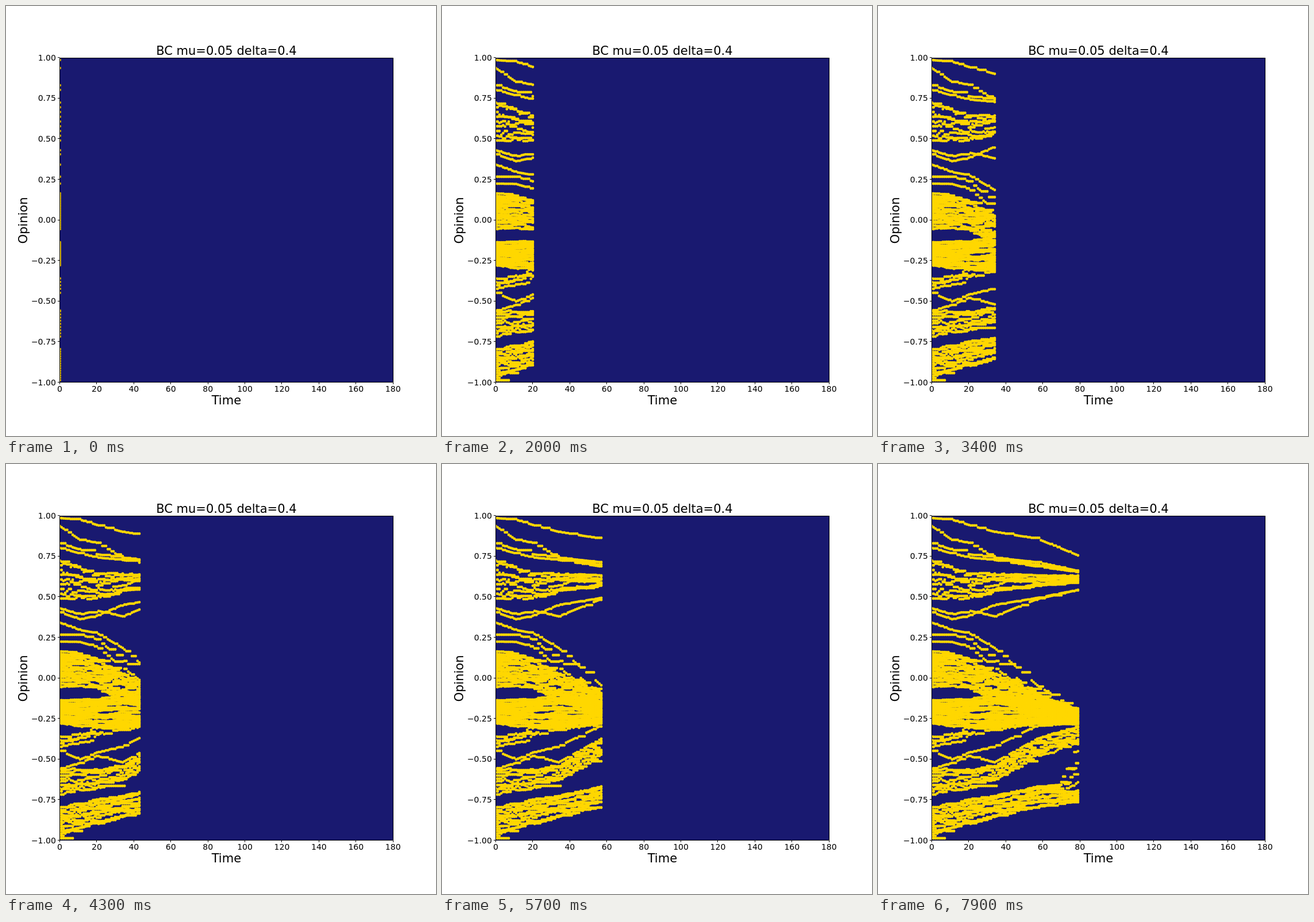
These frames come from a looping animation (748x748 px, 8 s). An HTML page with a canvas:

```html
<!DOCTYPE html>
<html lang="en">
<head>
<meta charset="utf-8">
<title>Opinion dynamics</title>
<style>
  html, body { margin: 0; width: 100%; height: 100%; overflow: hidden; background: #fff; }
  canvas, svg { position: absolute; left: 0; top: 0; width: 748px; height: 748px; }
  text { font-family: "DejaVu Sans", Verdana, sans-serif; font-size: 14px; text-anchor: middle; }
  .big { font-size: 21px; }
  .y { text-anchor: end; }
  path { fill: none; stroke: #000; stroke-width: 1; }
</style>
</head>
<body>
<canvas id="plot" width="748" height="748"></canvas>
<svg id="axes" viewBox="0 0 748 748">
  <text class="big" x="383.4" y="85">BC mu=0.05 delta=0.4</text>
  <text class="big" x="383.4" y="693">Time</text>
  <text class="big" transform="translate(37 373) rotate(-90)">Opinion</text>
</svg>
<script>
const LEFT = 93.5, RIGHT = 673.5, TOP = 90.5, BOTTOM = 654.5;
const UNIT = (673.2 - 93.5) / 180, STEP = 100, STEPS = 80, RADIUS = 2.4;

// Heights of single agents at the knot times.
const KNOTS = [0, 11, 20, 34, 57, 79];
const loners = [
  [94, 97, 106, 118, 130, 159],
  [108, 132, 137, 163, 171, 186],
  [251, 262, 255, 265, 235, 219],
  [258, 270, 264, 245, 233, 219],
  [276, 289, 294, 320, 385, 430],
  [499, 514, 502, 491, 455, 449],
  [530, 520, 508, 519, 478, 458]
];

// Crowds fill a strip below their top edge; widths are early, middle and late.
const crowds = [
  { size: 2, width: [8, 4, 1], top: [138, 149, 157, 163, 176, 187] },
  { size: 9, width: [66, 30, 11], top: [168, 181, 190, 190, 194, 194] },
  { size: 2, width: [12, 14, 1], top: [297, 297, 305, 340, 402, 432] },
  { size: 22, width: [62, 50, 13], top: [326, 328, 337, 365, 400, 429] },
  { size: 24, width: [40, 62, 17], top: [411, 410, 407, 400, 412, 436] },
  { size: 4, width: [18, 24, 5], top: [474, 469, 456, 437, 442, 446] },
  { size: 9, width: [44, 28, 34], top: [531, 529, 531, 522, 477, 456] },
  { size: 14, width: [54, 37, 33], top: [597, 588, 583, 577, 561, 556], rise: true }
];

let seed = 20;
function random() {
  seed = (seed * 1664525 + 1013904223) >>> 0;
  return seed / 4294967296;
}

function mix(a, b, t) { return a + (b - a) * t; }

function at(curve, t) {
  let i = 0;
  while (KNOTS[i + 1] < t) i++;
  return mix(curve[i], curve[i + 1], (t - KNOTS[i]) / (KNOTS[i + 1] - KNOTS[i]));
}

function widthAt([early, middle, late], t) {
  return t < 34 ? mix(early, middle, t / 34) : mix(middle, late, (t - 34) / 45);
}

const columns = Array.from({ length: STEPS }, () => new Path2D());
function dot(k, y) {
  const x = LEFT + k * UNIT;
  columns[k].moveTo(x + RADIUS, y);
  columns[k].arc(x, y, RADIUS, 0, Math.PI * 2);
}

// Opinions stay put until an encounter moves them.
function trace(chance, position) {
  let y = position(0);
  for (let k = 0; k < STEPS; k++) {
    if (k && random() < chance) y = position(k);
    dot(k, y);
  }
}

for (const curve of loners) trace(0.65, k => at(curve, k));

for (const { size, width, top, rise } of crowds) {
  for (let i = 0; i < size; i++) {
    const home = i / (size - 1);
    let u = home;
    trace(0.45, k => {
      if (k && size > 2) u += (random() - 0.5) * 1.6 / size + (home - u) * 0.2;
      u = Math.min(1, Math.max(0, u));
      // The nearest agents are pulled up late by the neighbouring crowd.
      const lift = rise ? Math.max(0, k - 69) * Math.max(0, 0.4 - home) * 18 : 0;
      return at(top, k) + widthAt(width, k) * u - lift;
    });
  }
}

const axes = document.getElementById("axes");
function add(name, attrs, label = "") {
  const node = document.createElementNS("http://www.w3.org/2000/svg", name);
  for (const key in attrs) node.setAttribute(key, attrs[key]);
  node.textContent = label;
  axes.append(node);
}
let lines = `M${LEFT} ${TOP}H${RIGHT}V${BOTTOM}H${LEFT}Z`;
for (let v = 0; v <= 180; v += 20) {
  const x = LEFT + v * UNIT;
  lines += `M${Math.floor(x) + 0.5} ${BOTTOM}v3.5`;
  add("text", { x, y: 671 }, v);
}
for (let i = -4; i <= 4; i++) {
  const y = 372.1 - i * 70.6;
  lines += `M${LEFT} ${Math.floor(y) + 0.5}h-3.5`;
  add("text", { x: 86.8, y: Math.round(y + 5), class: "y" }, (i / 4).toFixed(2).replace("-", "\u2212"));
}
add("path", { d: lines });

const ctx = document.getElementById("plot").getContext("2d");
ctx.beginPath();
ctx.rect(LEFT, TOP - 0.5, RIGHT - LEFT, BOTTOM - TOP + 0.5);
ctx.clip();

let shown = -1;
function draw(k) {
  if (k === shown) return;
  shown = k;
  ctx.fillStyle = "#191970";
  ctx.fillRect(0, 0, 748, 748);
  ctx.fillStyle = "#ffd700";
  for (let i = 0; i <= k; i++) ctx.fill(columns[i]);
}

const start = performance.now();
function tick() {
  draw(Math.floor((performance.now() - start) / STEP) % STEPS);
  requestAnimationFrame(tick);
}
tick();
</script>
</body>
</html>
```
